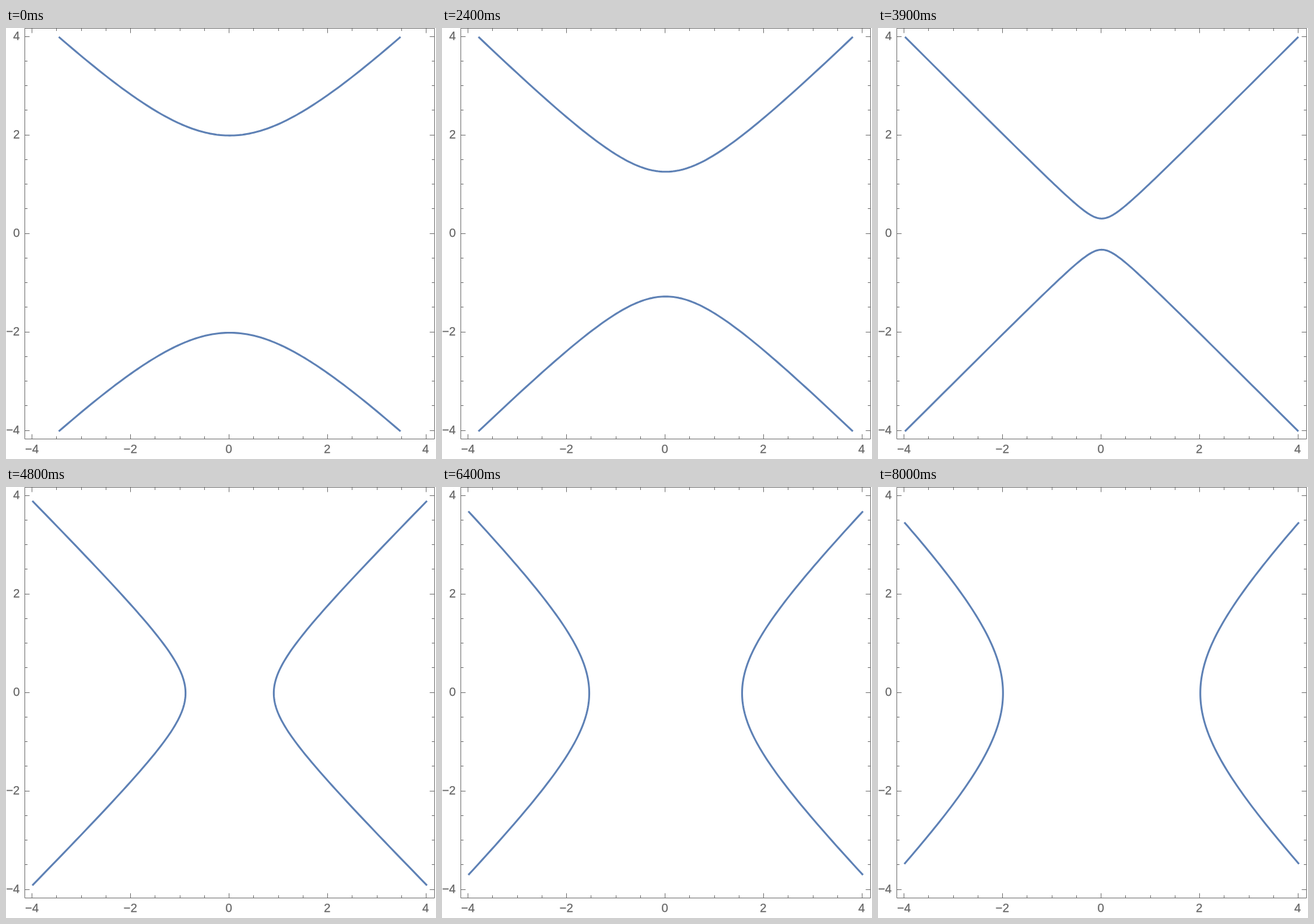
These frames come from a looping animation (720x722 px, 8100 ms). An HTML page:

```html
<!DOCTYPE html>
<html lang="en">
<head>
<meta charset="utf-8">
<title>Hyperbola family</title>
<style>
html, body { margin: 0; width: 100%; height: 100%; overflow: hidden; background: #fff; }
svg { display: block; }
text { font: 20px "Liberation Sans", Arial, sans-serif; fill: #666; stroke: #666; stroke-width: .25; }
#axes { fill: none; stroke: #666; stroke-width: 1; }
#curve { fill: none; stroke: #5e81b5; stroke-width: 3.1; stroke-linejoin: round; }
</style>
</head>
<body>
<svg width="720" height="722" viewBox="0 0 720 722">
  <path id="axes"/>
  <g id="labels"></g>
  <path id="curve"/>
</svg>
<script>
const box = { left: 31.5, right: 717.5, top: 0.5, bottom: 688.5 };
const origin = { x: 374.5, y: 345.3 };
const unit = 82.6;
const range = 4;
const stepMs = 100;
const steps = 81;
const byId = id => document.getElementById(id);

function addLabel(value, x, y, anchor) {
  const el = document.createElementNS("http://www.w3.org/2000/svg", "text");
  el.setAttribute("x", x);
  el.setAttribute("y", y);
  el.setAttribute("text-anchor", anchor);
  el.textContent = String(value).replace("-", "\u2212");
  byId("labels").append(el);
}

function drawAxes() {
  const { left, right, top, bottom } = box;
  let d = `M${left} ${top}H${right}V${bottom}H${left}Z`;
  for (let v = -range; v <= range; v += 0.5) {
    const major = v % 2 === 0;
    const len = major ? 8 : 4.5;
    const x = Math.floor(373.5 + 82.5 * v) + 0.5;
    const y = Math.floor(344 - 82.5 * v) + 0.5;
    d += `M${x} ${bottom}v${-len}M${x} ${top}v${len}`;
    d += `M${left} ${y}h${len}M${right} ${y}h${-len}`;
    if (major) {
      addLabel(v, 373 + 82.4 * v, 712, "middle");
      addLabel(v, 23, 350 - 82.4 * v, "end");
    }
  }
  byId("axes").setAttribute("d", d);
}

// One branch, traced as (a sinh s, a cosh s) out to the plot range.
function branch(c, sign) {
  const a = Math.sqrt(Math.abs(c));
  const end = a ? Math.acosh(range / a) : 1;
  const n = 60;
  const points = [];
  for (let i = -n; i <= n; i++) {
    const s = end * i / n;
    const across = a ? a * Math.sinh(s) : range * s;
    const along = sign * (a ? a * Math.cosh(s) : Math.abs(across));
    const [x, y] = c > 0 ? [along, across] : [across, along];
    points.push((origin.x + unit * x).toFixed(2) + " " + (origin.y - unit * y).toFixed(2));
  }
  return "M" + points.join("L");
}

let shown = -1;
function render(time) {
  const step = Math.floor(time / stepMs) % steps;
  if (step !== shown) {
    shown = step;
    const c = (step - 40) / 10; // x² − y² = c
    byId("curve").setAttribute("d", branch(c, 1) + branch(c, -1));
  }
}

drawAxes();
render(0);
const start = performance.now();
function tick() {
  render(performance.now() - start);
  requestAnimationFrame(tick);
}
requestAnimationFrame(tick);
</script>
</body>
</html>
```
